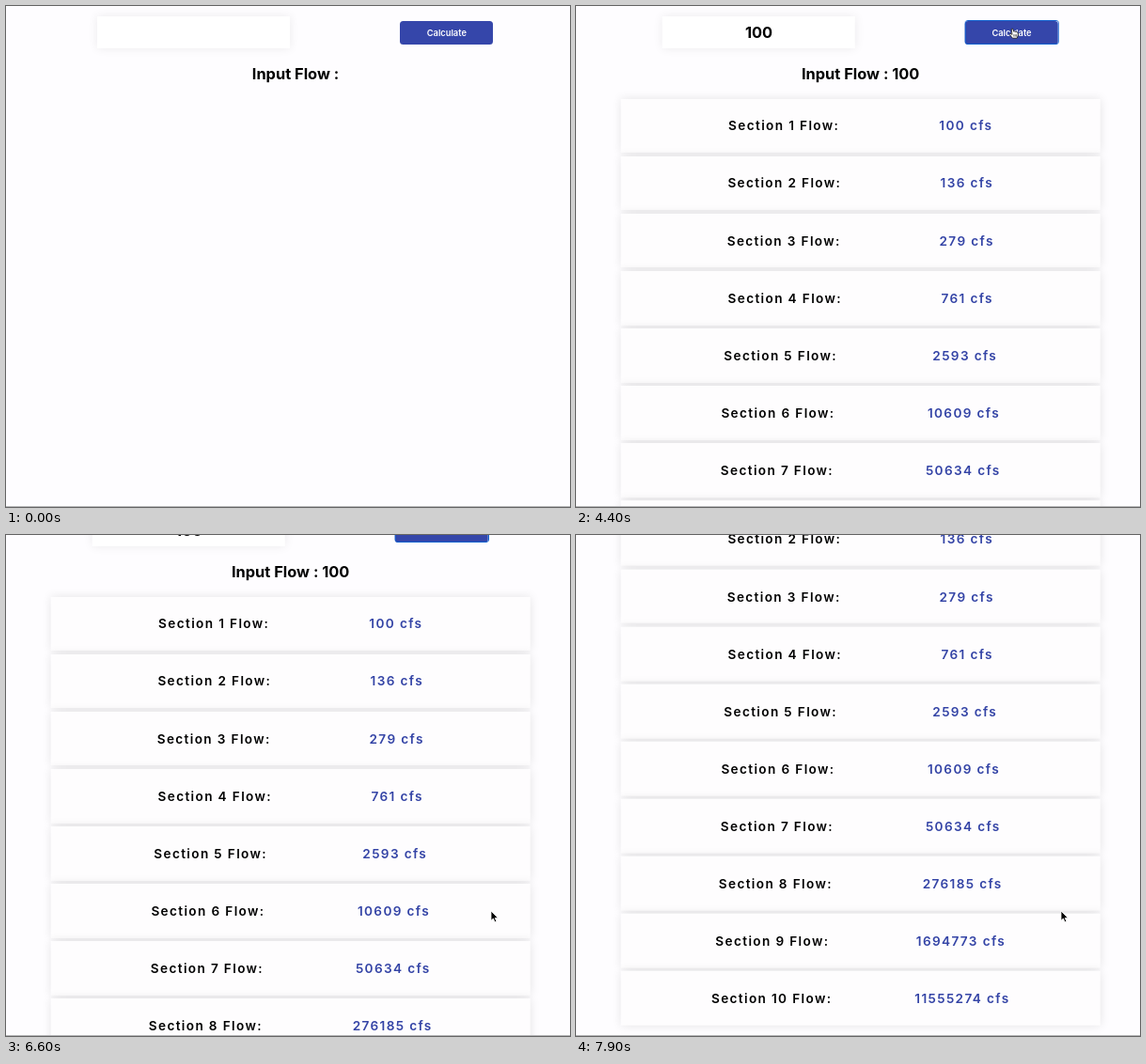
An HTML page that plays this animation: 600x533 px, repeating every 8 s.

```html
<!DOCTYPE html>
<html lang="en">
<head>
<meta charset="utf-8">
<title>Flow calculator</title>
<style>
  html, body { margin: 0; width: 100%; height: 100%; overflow: hidden; }
  body {
    position: relative;
    background: #fefdff;
    color: #000;
    font-family: Inter, sans-serif;
  }
  body::after {
    content: "";
    position: absolute;
    left: 0; right: 0; top: 532px;
    height: 1px;
    background: #b4b4b6;
  }

  /* every animation shares one 8 s clock and holds its value between stops */
  .page, .list, .field::after, .caret, .calc::after, .d, .pointer, .pointer svg {
    animation: 8s step-end infinite;
  }

  .page {
    position: absolute;
    left: 0; top: 0;
    width: 616px; height: 720px;
    animation-name: scroll, shift;
  }
  .field, .calc, .list, h3 { position: absolute; box-sizing: border-box; }

  .field {
    left: 97.3px; top: 10.5px;
    width: 205px; height: 34px;
    display: flex; align-items: center; justify-content: center;
    background: #fff;
    box-shadow: 0 0 10px rgba(0, 0, 0, .08);
    font-size: 16.4px; font-weight: 700;
  }
  .field::after, .calc::after {
    content: "";
    position: absolute;
    opacity: 0;
  }
  .field::after {
    inset: -.5px;
    border: 2px solid #1259b9;
    border-radius: 3px;
    animation-name: field-focus;
  }
  .caret {
    width: 1px; height: 20px;
    margin-right: -1px;
    background: #000;
    opacity: 0;
    animation-name: field-focus;
  }

  .calc {
    left: 419.3px; top: 15.5px;
    width: 99px; height: 25px;
    border-radius: 3.5px;
    background: #3546aa;
    color: #fff;
    text-align: center;
    font-size: 9.3px; font-weight: 600; line-height: 25px;
  }
  .calc::after {
    inset: -.5px;
    border: 1px solid #1261cf;
    border-radius: 3px;
    animation-name: calc-focus;
  }

  h3 {
    left: 0; top: 60px;
    width: 616px;
    margin: 0;
    text-align: center;
    white-space: pre;
    font-size: 16.4px; font-weight: 700; line-height: 24px;
  }
  .d { font-size: 0; white-space: pre; }
  .d1 { animation-name: type1; }
  .d2 { animation-name: type2; }
  .d3 { animation-name: type3; }

  .list {
    left: 53.3px; top: 98.5px;
    width: 509.5px;
    opacity: 0;
    animation-name: list;
  }
  .row {
    display: flex; align-items: center; justify-content: space-evenly;
    box-sizing: border-box;
    height: 57.9px;
    margin-bottom: 3.17px;
    padding: 0 8px;
    background: #fefdfe;
    box-shadow: 0 0 10px rgba(0, 0, 0, .1);
    font-size: 13.6px; font-weight: 600;
    letter-spacing: 1.36px;
    white-space: nowrap;
  }
  .row b { font-weight: 600; color: #3444a6; }

  .pointer {
    position: absolute;
    left: 0; top: 0;
    animation-name: move;
  }
  .pointer svg {
    position: absolute;
    left: 0; top: 0;
    overflow: visible;
    opacity: 0;
  }
  .arrow { animation-name: arrow !important; }
  .beam { animation-name: beam !important; }
  .hand { animation-name: hand !important; }

  @keyframes field-focus { 0% { opacity: 0 } 23.75% { opacity: 1 } 51.25% { opacity: 0 } }
  @keyframes calc-focus { 0% { opacity: 0 } 51.25% { opacity: 1 } }
  @keyframes list { 0% { opacity: 0 } 52.5% { opacity: 1 } }
  @keyframes shift { 0% { translate: 0 } 52.5%, 100% { translate: -5.3px } }
  @keyframes type1 { 0% { font-size: 0 } 31.25%, 100% { font-size: 16.4px } }
  @keyframes type2 { 0% { font-size: 0 } 35%, 100% { font-size: 16.4px } }
  @keyframes type3 { 0% { font-size: 0 } 38.75%, 100% { font-size: 16.4px } }

  @keyframes arrow {
    0% { opacity: 0 } 15% { opacity: 1 } 23.75% { opacity: 0 }
    46.25% { opacity: 1 } 50% { opacity: 0 } 71.25% { opacity: 1 }
  }
  @keyframes beam {
    0% { opacity: 0 } 23.75% { opacity: 1 } 31.25% { opacity: 0 }
    45% { opacity: 1 } 46.25% { opacity: 0 }
  }
  @keyframes hand { 0% { opacity: 0 } 50% { opacity: 1 } 71.25% { opacity: 0 } }

  @keyframes move {
    0% { transform: translate(236px, 475px) }
    16.25% { transform: translate(234px, 438px) }
    17.5% { transform: translate(231px, 370px) }
    18.75% { transform: translate(227px, 285px) }
    20% { transform: translate(223px, 200px) }
    21.25% { transform: translate(219px, 125px) }
    22.5% { transform: translate(216px, 68px) }
    23.75% { transform: translate(214px, 36px) }
    25% { transform: translate(213.5px, 29px) }
    45% { transform: translate(232px, 30px) }
    46.25% { transform: translate(305px, 33px) }
    47.5% { transform: translate(375px, 34px) }
    48.75% { transform: translate(415px, 32px) }
    50% { transform: translate(452px, 29px) }
    51.25% { transform: translate(464px, 24px) }
    70% { transform: translate(468px, 34px) }
    71.25% { transform: translate(480px, 105px) }
    72.5% { transform: translate(496px, 220px) }
    73.75% { transform: translate(508px, 325px) }
    75% { transform: translate(514px, 385px) }
    76.25%, 100% { transform: translate(516px, 400px) }
  }

  @keyframes scroll {
    0% { transform: none }
    78.75% { transform: translateY(-2.5px) }
    80% { transform: translateY(-9.3px) }
    81.25% { transform: translateY(-20px) }
    82.5% { transform: translateY(-33px) }
    83.75% { transform: translateY(-45px) }
    85% { transform: translateY(-53px) }
    87.5% { transform: translateY(-55.5px) }
    88.75% { transform: translateY(-60px) }
    90% { transform: translateY(-70px) }
    91.25% { transform: translateY(-84px) }
    92.5% { transform: translateY(-100px) }
    93.75% { transform: translateY(-118px) }
    95% { transform: translateY(-137px) }
    96.25% { transform: translateY(-164px) }
    97.5%, 100% { transform: translateY(-184.3px) }
  }
</style>
</head>
<body>
  <div class="page">
    <div class="field"><span class="d d1">1</span><span class="d d2">0</span><span class="d d3">0</span><i class="caret"></i></div>
    <div class="calc">Calculate</div>
    <h3>Input Flow :<span class="d d1"> 1</span><span class="d d2">0</span><span class="d d3">0</span></h3>
    <div class="list"></div>
  </div>

  <div class="pointer">
    <svg class="arrow" width="9" height="13">
      <path d="M0 0V10.2L2.4 8L4 11.8L5.8 11L4.2 7.4H7.3Z" fill="#000" stroke="#fff" stroke-width=".8"/>
    </svg>
    <svg class="beam" width="1" height="1">
      <path d="M-2.8-5.2Q-.4-5.2 0-4Q.4-5.2 2.8-5.2M0-4V4M-2.8 5.2Q-.4 5.2 0 4Q.4 5.2 2.8 5.2M-1.4 1.8H1.4" fill="none" stroke="#222" stroke-width="1.1"/>
    </svg>
    <svg class="hand" width="10" height="12">
      <path d="M-.8 .6Q0-.6 .9 .5L1.7 3.2Q2.8 2.6 3.4 3.5Q4.6 3 5 4Q6.2 3.8 6.3 5V7.2L5.2 10.2H.4L-2.5 6.6Q-2.6 5.3-1.3 5.6L0 6.4Z" fill="#fff" stroke="#111" stroke-width=".8"/>
      <path d="M1.8 6.2V8.6M3.2 6.2V8.6M4.6 6.2V8.6" stroke="#111" stroke-width=".6"/>
    </svg>
  </div>

  <script>
    const flows = [100, 136, 279, 761, 2593, 10609, 50634, 276185, 1694773, 11555274];
    document.querySelector(".list").innerHTML = flows
      .map((flow, i) => `<div class="row"><span>Section ${i + 1} Flow:</span><b>${flow} cfs</b></div>`)
      .join("");
  </script>
</body>
</html>
```
